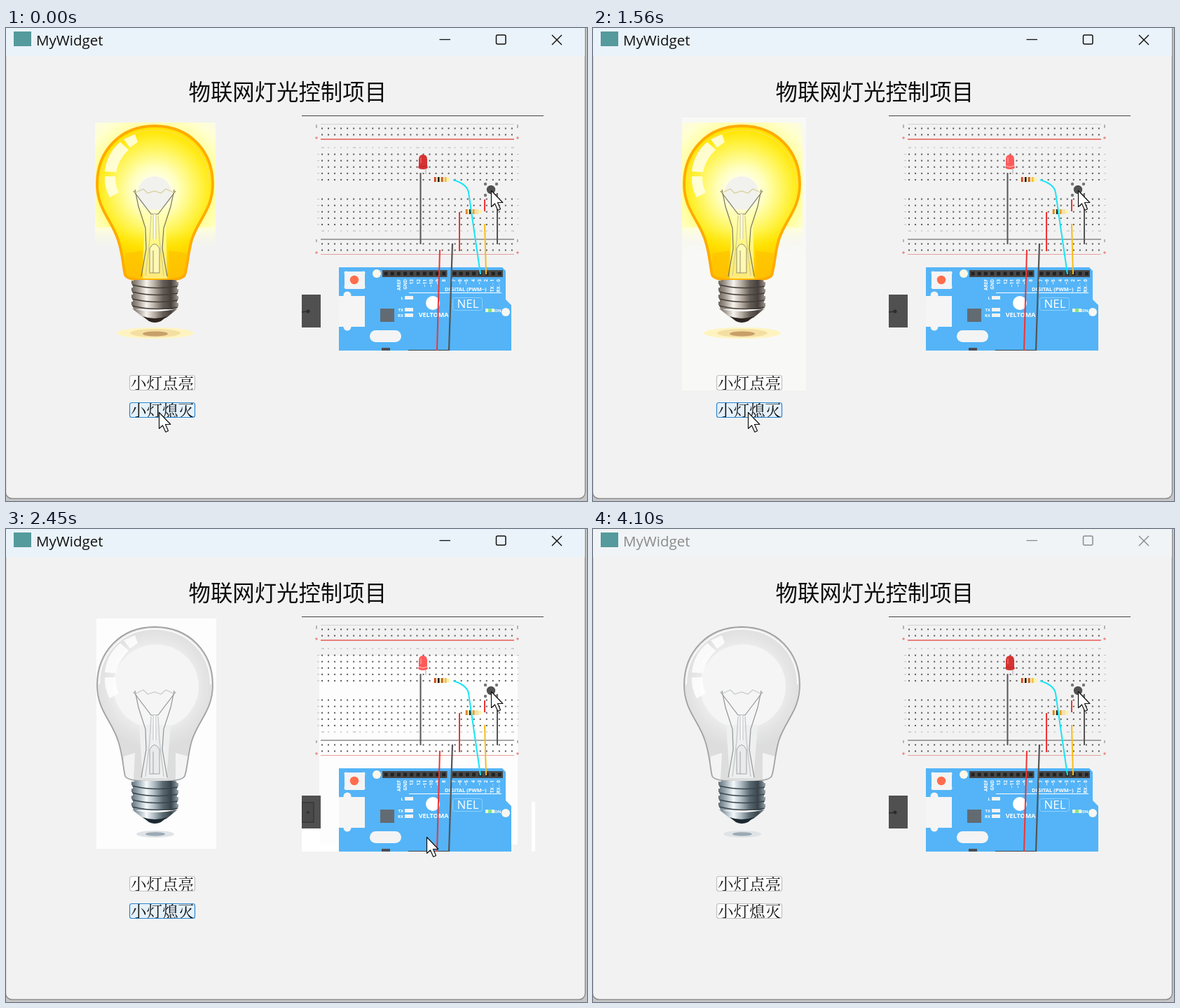
Animation of 829 by 676 pixels, one loop 4.12 s. Source, as an HTML page with a canvas:

```html
<!DOCTYPE html>
<html lang="zh-CN">
<head>
<meta charset="utf-8">
<title>MyWidget</title>
<style>
html, body { margin: 0; width: 100%; height: 100%; overflow: hidden; background: #f2f2f2; }
canvas { display: block; }
</style>
</head>
<body>
<canvas id="stage" width="829" height="676"></canvas>
<script>
const ctx = document.getElementById('stage').getContext('2d');
const LOOP = 4120;
const BG = '#f2f2f2';
const SANS = '"Open Sans", "Noto Sans", sans-serif';
const HEI = '"Noto Sans CJK SC", "Noto Sans CJK", sans-serif';
const SONG = '"Noto Serif CJK SC", "Noto Sans CJK SC", "Noto Sans CJK", serif';

// Pointer stops: time, x, y
const mousePath = [
  [0, 218, 549], [530, 218, 549], [830, 220, 505], [1080, 220, 505],
  [1380, 221, 549], [1680, 221, 549], [2070, 434, 507], [2450, 600, 440],
  [2650, 628, 425], [2850, 628, 425], [3200, 540, 358], [3400, 556, 352], [3650, 745, 678]
];
const boardPath = [
  [0, 692, 232], [1800, 692, 232], [2000, 736, 415], [2160, 736, 415], [2420, 692, 232]
];

const within = (t, a, b) => t >= a && t < b;

function along(path, t) {
  const i = path.findIndex(p => p[0] > t);
  if (i < 0) return path[path.length - 1].slice(1);
  const [t0, x0, y0] = path[i - 1], [t1, x1, y1] = path[i];
  const u = (t - t0) / (t1 - t0), e = u * u * (3 - 2 * u);
  return [x0 + (x1 - x0) * e, y0 + (y1 - y0) * e];
}

function rect(x, y, w, h, color) {
  ctx.fillStyle = color;
  ctx.fillRect(x, y, w, h);
}

function round(x, y, w, h, r, fill, stroke, width = 1) {
  ctx.beginPath();
  ctx.roundRect(x, y, w, h, r);
  if (fill) { ctx.fillStyle = fill; ctx.fill(); }
  if (stroke) { ctx.strokeStyle = stroke; ctx.lineWidth = width; ctx.stroke(); }
}

function oval(x, y, rx, ry, color) {
  ctx.beginPath();
  ctx.ellipse(x, y, rx, ry, 0, 0, Math.PI * 2);
  ctx.fillStyle = color;
  ctx.fill();
}

const dot = (x, y, r, color) => oval(x, y, r, r, color);

function line(color, width, ...pts) {
  ctx.beginPath();
  for (let i = 0; i < pts.length; i += 2) ctx.lineTo(pts[i], pts[i + 1]);
  ctx.strokeStyle = color;
  ctx.lineWidth = width;
  ctx.stroke();
}

function shape(d, fill, stroke, width = 1) {
  const p = new Path2D(d);
  if (fill) { ctx.fillStyle = fill; ctx.fill(p); }
  if (stroke) { ctx.strokeStyle = stroke; ctx.lineWidth = width; ctx.stroke(p); }
}

function text(s, x, y, font, color, align = 'left') {
  ctx.font = font;
  ctx.textAlign = align;
  ctx.fillStyle = color;
  ctx.fillText(s, x, y);
}

function grad(g, ...colors) {
  colors.forEach((c, i) => g.addColorStop(i / (colors.length - 1), c));
  return g;
}

const radial = (x, y, r0, r1, ...c) => grad(ctx.createRadialGradient(x, y, r0, x, y, r1), ...c);
const across = (x0, x1, ...c) => grad(ctx.createLinearGradient(x0, 0, x1, 0), ...c);
const down = (y0, y1, ...c) => grad(ctx.createLinearGradient(0, y0, 0, y1), ...c);

function drawFrame(active) {
  rect(0, 0, 829, 676, '#c6c6c6');
  round(-0.5, -10, 827, 682.5, 9, BG, '#8e8e8e', 1.5);
  rect(0, 0, 826, 40, active ? '#eaf3fa' : '#f0f4f7');
  const ink = active ? '#111' : '#8b8b8b';
  rect(11, 5, 25, 21, '#559a9c');
  text('MyWidget', 43, 25, '20.5px ' + SANS, ink);
  line(ink, 1.3, 618.5, 16.5, 634, 16.5);
  round(699.5, 10, 13.5, 13, 2, null, ink, 1.5);
  line(ink, 1.4, 779, 10, 793, 24);
  line(ink, 1.4, 793, 10, 779, 24);
  text('物联网灯光控制项目', 260.5, 103, '500 31.4px ' + HEI, '#0c0c0c');
}

const GLASS = 'M212 140C262 140 295 176 295 223C295 259 274 274 265 303C259 324 259 342 255 353' +
  'Q252 361 212 361Q173 361 170 353C167 342 167 324 160 303C151 274 130 259 130 223C130 176 163 140 212 140Z';

function drawFilament(lit) {
  const dark = lit ? '#77745f' : '#929497', soft = lit ? '#d7cf96' : '#c8cacd';
  line(dark, 1.2, 184, 231, 189, 255, 199, 286, 200, 315, 193, 355);
  line(dark, 1.2, 240, 231, 235, 255, 225, 286, 223, 315, 230, 355);
  line(dark, 1.2, 182, 233, 207, 266, 217, 266, 242, 233);
  line(soft, 1.2, 183, 236, 196, 230, 202, 236, 212, 233, 221, 236, 228, 230, 241, 236);
  line(soft, 5, 212, 266, 212, 302);
  line('#fff', 2.5, 212, 266, 212, 302);
  shape('M207 268L205 303L199 354M217 268L219 303L225 354', null, soft, 1.4);
  shape('M205 315Q212 302 219 315V350H205Z', lit ? '#ffffe288' : '#e9eaeb', dark, 0.8);
  line(dark, 0.8, 210, 318, 210, 350);
}

function drawBase(lit) {
  const metal = lit
    ? across(177, 247, '#5d5650', '#a39b92', '#f7f4ee', '#b5aca2', '#665e58', '#46403c', '#a69e96')
    : across(177, 247, '#53616a', '#9cabb4', '#f4f8fa', '#aab7bf', '#5b6971', '#39444b', '#9eabb2');
  const groove = lit ? '#443d37' : '#38454d';
  round(181, 360, 63, 42, 4, metal);
  for (let i = 0; i < 4; i++) {
    const y = 364 + i * 10;
    shape(`M179 ${y - 3}Q212 ${y + 5} 246 ${y - 1}V${y + 4}Q212 ${y + 10} 179 ${y + 2}Z`, metal);
    shape(`M180 ${y + 3}Q212 ${y + 11} 245 ${y + 5}`, null, groove, 1.6);
  }
  shape('M180 401Q212 409 245 401L229 414Q212 421 196 414Z', metal);
  shape('M195 412Q212 418 230 412L221 419Q212 423 204 419Z', lit ? '#2e2520' : '#1c2931');
}

function drawBulb(lit) {
  if (lit) {
    const glow = radial(212, 228, 70, 128, '#ffff6a', '#ffffa8', '#ffffd2', '#fafae6');
    ctx.save();
    ctx.beginPath();
    ctx.rect(127, 135, 172, 185);
    ctx.clip();
    ctx.fillStyle = glow;
    ctx.fillRect(127, 135, 172, 150);
    ctx.fillStyle = down(285, 320, '#ffffd8', '#f2f2f200');
    ctx.fillRect(127, 285, 172, 35);
    ctx.restore();
  }
  ctx.save();
  ctx.clip(new Path2D(GLASS));
  if (lit) {
    rect(125, 135, 175, 230, radial(212, 232, 15, 105, '#fffff0', '#ffffc0', '#fff97c', '#fff13a', '#ffe500', '#ffd000'));
    rect(125, 290, 175, 75, down(290, 362, '#ffe00000', '#ffd20099', '#ffc000'));
    shape('M198 265H228L230 358H195Z', '#ffffb8aa');
    shape('M170 322L195 318L192 358H170ZM232 318L258 322L254 358H234Z', '#ffbe0088');
  } else {
    rect(125, 135, 175, 230, radial(212, 225, 20, 90, '#f6f6f6', '#f4f4f4', '#eeeeee', '#e4e4e4', '#dddddd'));
    oval(214, 225, 61, 60, '#f5f5f5');
    shape('M190 280H235L229 356H195Z', '#eeefef');
    shape('M168 325L184 320L182 358H168ZM242 320L260 325L257 358H242Z', '#ffffffaa');
  }
  const shine = lit ? '#ffffe8e0' : '#ffffffd0';
  shape('M141 205C143 187 151 173 163 163L175 174C166 183 160 192 157 206Z', shine);
  shape('M168 159L184 152L188 163L177 171Z', shine);
  shape('M141 212L156 212Q156 226 161 235L148 242Q140 227 141 212Z', shine);
  ctx.restore();
  if (lit) dot(212, 236, 24, '#f1f1ee');
  drawFilament(lit);
  if (lit) {
    shape(GLASS, null, '#ffab00', 3.8);
    shape('M135 222C135 181 166 146 212 146C258 146 290 181 290 222', null, '#ffe15a', 1.2);
  } else {
    shape(GLASS, null, '#a0a2a4', 1.8);
    shape('M133 222C133 179 165 143 212 143C260 143 292 179 292 222', null, '#fafafa', 2);
  }
  drawBase(lit);
  if (lit) {
    oval(213, 436, 55, 8, '#fff4c0');
    oval(213, 436, 36, 6, '#f4dfa3');
    oval(213, 437, 18, 3.5, '#c89f68');
  } else {
    oval(213, 436, 27, 5, '#dfe3e6');
    oval(213, 436, 14, 2.8, '#9caab5');
  }
}

function dots(y) {
  for (let i = 0; i < 31; i++) rect(450 + i * 9.03, y - 1, 2, 2, '#575757');
}

function drawBreadboard() {
  line('#444', 1, 422, 125.5, 767, 125.5);
  line('#d2d2d2', 1, 449, 137.5, 725, 137.5);
  line('#e65a52', 1.5, 449, 159, 725, 159);
  line('#555', 1.2, 449, 302, 725, 302);
  line('#e5a09c', 1, 449, 323.5, 725, 323.5);
  [143.5, 152.5, 308.5, 317.5].forEach(dots);
  for (let i = 0; i < 5; i++) {
    dots(180.5 + i * 9.1);
    dots(244.5 + i * 9.1);
    for (const x of [444, 729]) {
      rect(x, 180 + i * 9.1, 3, 1, '#c4c4c4');
      rect(x, 244 + i * 9.1, 3, 1, '#c4c4c4');
    }
  }
  for (let i = 0; i < 31; i++) {
    const w = i % 5 ? 2 : 4;
    rect(450 + i * 9.03, 170, w, 2, '#d0d0d0');
    rect(450 + i * 9.03, 289, w, 2, '#d0d0d0');
  }
  for (const x of [443, 730]) {
    for (const y of [157, 321]) {
      line('#e5716c', 1, x - 2, y, x + 2, y);
      line('#e5716c', 1, x, y - 2, x, y + 2);
    }
    line('#777', 1, x, 138, x, 143);
    line('#777', 1, x, 302, x, 306);
  }
}

function drawResistor(x, y, bands) {
  rect(x, y, 19, 7, '#f5e2ae');
  rect(x + 19, y + 1, 4, 5, '#fbf3a0');
  bands.forEach((c, i) => rect(x + 1 + i * 5, y, 2.5, 7, c));
}

function drawController(altJack) {
  rect(422, 381, 27, 47, '#505050');
  if (altJack) {
    rect(422, 390, 18, 30, '#3c3c3c');
    rect(423, 392, 15, 26, '#494949');
    dot(431, 405, 2, '#333');
  } else {
    line('#2c2c2c', 1.5, 422, 406, 431, 405);
    dot(431, 405, 2.5, '#2c2c2c');
  }
  shape('M475 342H708L713 347V388L721 396V461H475Z', '#54b4f7');
  dot(529, 351, 6, '#fbf8e8');
  dot(713, 406, 6, '#f7f7f2');
  for (const [x, n] of [[537, 10], [635, 8]]) {
    rect(x, 346, n * 9.25, 10, '#484848');
    for (let i = 0; i < n; i++) rect(x + 2.5 + i * 9.2, 348.5, 5, 5, '#222');
  }
  round(483, 348, 29, 25, 2, '#f4f4f4');
  for (const x of [485, 510]) for (const y of [350, 370]) dot(x, y, 2.5, '#f4f4f4');
  dot(497, 360, 6.2, '#ff6d4d');
  dot(487, 382, 5.5, '#f5f5f5');
  dot(487, 427, 5.5, '#f5f5f5');
  rect(475, 383, 37, 44, '#f5f5f5');
  rect(534, 401, 20, 19, '#636b72');
  round(519, 432, 45, 17, 8.5, '#f4f4f4');
  rect(536, 457, 12, 4, '#4a4f55');
  line('#444', 1, 574, 460.5, 632, 460.5);

  const tiny = 'bold 6.5px ' + SANS;
  const left = ['AREF', 'GND', '13', '12', '~11', '~10', '~9', '8'];
  const right = ['7', '~6', '~5', '4', '~3', '2', 'TX→1', 'RX←0'];
  const pin = (s, x) => {
    ctx.save();
    ctx.translate(x, 359);
    ctx.rotate(-Math.PI / 2);
    text(s, 0, 0, tiny, '#fff', 'right');
    ctx.restore();
  };
  left.forEach((s, i) => pin(s, 563 + i * 9.2));
  right.forEach((s, i) => pin(s, 641 + i * 9.2));
  text('DIGITAL (PWM~)', 626, 376, 'bold 7.5px ' + SANS, '#fff');
  line('#fff', 1.2, 575, 378.5, 707, 378.5);
  [['L', 386], ['TX', 403], ['RX', 411]].forEach(([s, y]) => {
    text(s, 567, y + 2, 'bold 6px ' + SANS, '#fff', 'right');
    rect(569, y - 3, 12, 5, '#f3f3f3');
  });
  dot(609, 393, 10, '#fff');
  text('VELTOMA', 610, 413, 'bold 9px ' + SANS, '#fff', 'center');
  round(637.5, 385.5, 42, 18, 3, null, '#8fd0fb');
  text('NEL', 659, 400, '17px ' + SANS, '#fff', 'center');
  rect(684, 401, 13, 5, '#e8f7da');
  rect(688, 401, 5, 5, '#86e58c');
  text('ON', 697, 405.5, 'bold 6px ' + SANS, '#fff');
}

function drawParts(ledOn) {
  line('#555', 2, 591.5, 207, 591.5, 309);
  line('#aaa', 1, 599, 202, 599, 209);
  shape('M589 197V188Q589 181 595 181Q601 181 601 188V197L602 199Q601 202 595 202Q589 202 588 199Z', ledOn ? '#ff5a5a' : '#d63232');
  line(ledOn ? '#ffc4c4' : '#bd2929', 1, 589, 197, 595, 198.5, 601, 197);
  rect(591, 185, 2, 8, ledOn ? '#ff8585' : '#e45757');

  line('#f03434', 2, 647, 263, 647, 319);
  drawResistor(610, 213, ['#d43b28', '#1c1c1c', '#bd5522', '#efc344']);
  drawResistor(655, 259, ['#df812e', '#1c1c1c', '#ef9d2e']);
  line('#f03434', 2, 683, 245, 683, 262);
  line('#555', 2, 701, 236, 701, 309);
  line('#f7bd18', 2, 683, 280, 685, 352);
  shape('M638 217Q658 223 660 235L677 352', null, '#1be4f4', 2);
  line('#f03434', 2, 619, 317, 615, 461);
  line('#555', 2.2, 637, 308, 632, 461);
  for (const x of [684, 700]) for (const y of [223, 239]) dot(x, y, 2.2, '#777');
  dot(692, 231, 6.2, '#505050');
}

const LOOKS = {
  normal: ['#fbfbfb', '#c2c2c2'],
  hover: ['#e4f0fa', '#2a86cf'],
  pressed: ['#cbe3f6', '#1266ad']
};

function drawButton(label, y, look) {
  const [fill, edge] = LOOKS[look];
  round(176.5, y + 0.5, 93, 21, 3, fill, edge, 1.2);
  ctx.save();
  ctx.beginPath();
  ctx.rect(177, y + 1, 92, 20);
  ctx.clip();
  text(label, 178, y + 19.5, '22.5px ' + SONG, '#111');
  ctx.restore();
}

function drawPointer([x, y]) {
  ctx.save();
  ctx.translate(x + 0.5, y + 0.5);
  ctx.lineJoin = 'round';
  shape('M0 0V23L5 18.5L9.3 28L13 26.3L9 17H16.3Z', '#fff', '#111', 1.2);
  ctx.restore();
}

function drawPanels(t, lit) {
  if (lit && t > 900) rect(127, 128, 177, 390, '#f8f8f6');
  if (within(t, 1720, 4020)) {
    rect(129, 128, 171, 329, '#fdfdfd');
    rect(422, 390, 53, 71, '#fff');
    if (t < 2450) {
      rect(600, 181, 108, 54, '#fdfdfd');
      rect(700, 390, 54, 71, '#fff');
    } else {
      rect(447, 181, 283, 270, '#fdfdfd');
      rect(750, 390, 5, 71, '#fff');
    }
  }
}

function draw(t) {
  const lit = t < 60 || within(t, 900, 1720);
  const led = within(t, 900, 1720) || within(t, 2450, 3760);
  const altJack = within(t, 900, 1300) || within(t, 1720, 4020);
  const onLook = within(t, 900, 1070) ? 'pressed' : within(t, 780, 1300) ? 'hover' : 'normal';
  const offLook = within(t, 30, 100) || within(t, 1600, 1700) ? 'pressed'
    : t < 620 || within(t, 1300, 2480) ? 'hover' : 'normal';

  drawFrame(t < 4020);
  drawPanels(t, lit);
  drawBulb(lit);
  drawBreadboard();
  drawController(altJack);
  drawParts(led);
  drawButton('小灯点亮', 496, onLook);
  drawButton('小灯熄灭', 535, offLook);
  drawPointer(along(boardPath, t));
  if (t < 3650) drawPointer(along(mousePath, t));
}

const start = performance.now();
function tick() {
  draw((performance.now() - start) % LOOP);
  requestAnimationFrame(tick);
}
tick();
</script>
</body>
</html>
```
